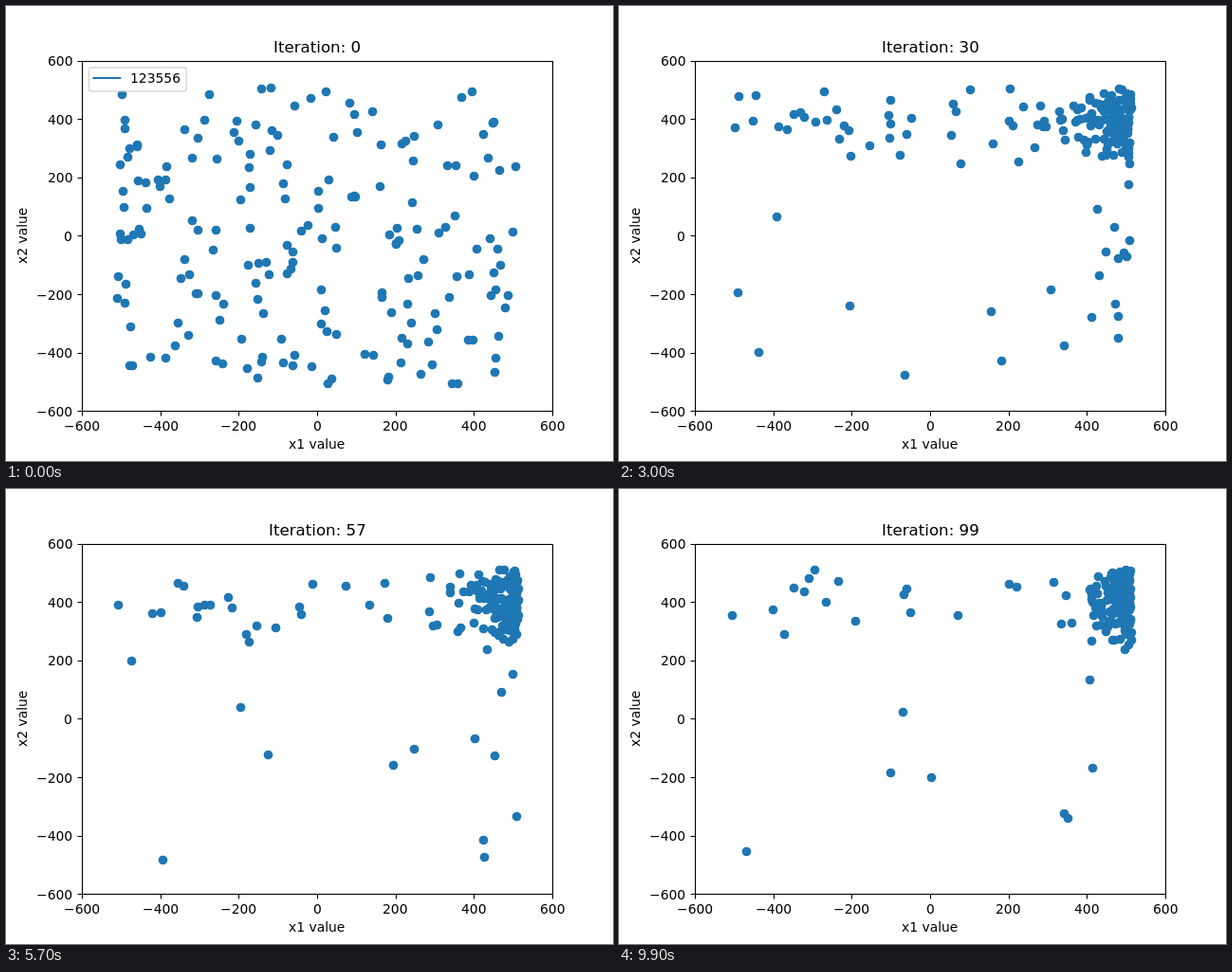
Recreate the animation shown at these times as an HTML page with a canvas. Size 640 px wide and 480 px high, loop 10000 ms.

```html
<!DOCTYPE html>
<html lang="en">
<head>
<meta charset="utf-8">
<title>Population scatter</title>
<style>
  html, body { margin: 0; width: 100%; height: 100%; overflow: hidden; background: #fff; }
  canvas, svg { position: absolute; left: 0; top: 0; width: 640px; height: 480px; display: block; }
  text { font: 13.889px "DejaVu Sans", sans-serif; fill: #000; }
  .title { font-size: 16.667px; }
</style>
</head>
<body>
<canvas id="dots" width="640" height="480"></canvas>
<svg id="chart" viewBox="0 0 640 480">
  <rect x="80.5" y="58.5" width="496" height="369" fill="none" stroke="#000" stroke-width="1.11"/>
  <path id="ticks" stroke="#000" stroke-width="1.11"/>
  <g id="legend">
    <rect x="87.4" y="65" width="102.8" height="25" rx="2.8" fill="#fff" fill-opacity=".8" stroke="#ccc" stroke-opacity=".8" stroke-width="1.39"/>
    <path d="M92.5 76H120.3" stroke="#1f77b4" stroke-width="2.08" stroke-linecap="square"/>
    <text x="131" y="81">123556</text>
  </g>
</svg>
<script>
const STEP = 100, STEPS = 100, SIZE = 190, EDGE = 512;
const byId = id => document.getElementById(id);
const ctx = byId("dots").getContext("2d");
const chart = byId("chart"), legend = byId("legend");

const px = x => 80 + (x + 600) * 496 / 1200;
const py = y => 427.2 - (y + 600) * 369.6 / 1200;
const snap = v => Math.round(v) + 0.5;

function seeded(seed) {
  let a = Math.imul(seed + 1, 0x9E3779B1);
  return () => {
    a = (a + 0x6D2B79F5) | 0;
    let t = Math.imul(a ^ (a >>> 15), 1 | a);
    t = (t + Math.imul(t ^ (t >>> 7), 61 | t)) ^ t;
    return ((t ^ (t >>> 14)) >>> 0) / 4294967296;
  };
}

// The population drifts from a uniform spread to the upper right corner.
function population(k) {
  const rnd = seeded(k);
  const span = (a, b) => a + (b - a) * rnd();
  const tail = s => -s * Math.log(1 - rnd());
  const bell = (mean, sd) => {
    const y = mean + sd * (rnd() + rnd() + rnd() + rnd() - 2) * 1.73;
    return y > EDGE ? bell(mean, sd) : y;
  };
  const decay = Math.exp(-k / 45);
  const scale = 34 + 90 * Math.exp(-k / 25);
  const pts = [];
  const add = (n, make) => {
    const end = Math.min(SIZE, pts.length + Math.round(n));
    while (pts.length < end) pts.push(make());
  };

  add(SIZE * Math.exp(-k / 6), () => [span(-EDGE, EDGE), span(-EDGE, EDGE)]);
  // stragglers below, a band along the top, and the dense corner
  add(5 + 30 * decay, () => [
    rnd() < 0.4 ? span(-EDGE, 300) : EDGE - Math.min(tail(90), 400),
    span(-EDGE, 215)
  ]);
  add(11 + 48 * decay, () => [span(-EDGE, 330), bell(385, 68)]);
  add(SIZE, () => [EDGE - Math.min(tail(scale), 310), bell(400, 72)]);
  return pts;
}

// Sets text on whole pixels; align is 0 for left, 0.5 for centre, 1 for right.
function setText(el, text, x, align) {
  el.textContent = text;
  el.setAttribute("x", Math.round(x - align * el.getComputedTextLength()));
}

function addText(text, x, y, align = 0.5, attrs = {}) {
  const el = document.createElementNS("http://www.w3.org/2000/svg", "text");
  for (const name in attrs) el.setAttribute(name, attrs[name]);
  el.setAttribute("y", y);
  chart.append(el);
  setText(el, text, x, align);
  return el;
}

function buildAxes() {
  let marks = "";
  for (let v = -600; v <= 600; v += 200) {
    const label = String(v).replace("-", "\u2212");
    marks += `M${snap(px(v))} 427.5v5M80.5 ${snap(py(v))}h-5`;
    addText(label, px(v), 448);
    addText(label, 70.3, Math.round(py(v) + 5.6), 1);
  }
  byId("ticks").setAttribute("d", marks);
  addText("x1 value", 328, 467);
  addText("x2 value", -242.4, 22, 0.5, { transform: "rotate(-90)" });
}

function draw(k) {
  ctx.clearRect(0, 0, 640, 480);
  ctx.fillStyle = "#1f77b4";
  for (const [x, y] of population(k)) {
    ctx.beginPath();
    ctx.arc(snap(px(x)), snap(py(y)), 4.86, 0, Math.PI * 2);
    ctx.fill();
  }
  setText(title, "Iteration: " + k, 328, 0.5);
  legend.style.display = k === 0 ? "" : "none";
}

let shown = -1;
function tick() {
  const k = Math.floor(performance.now() / STEP) % STEPS;
  if (k !== shown) draw(shown = k);
  requestAnimationFrame(tick);
}

buildAxes();
const title = addText("", 328, 49, 0.5, { class: "title" });
tick();
</script>
</body>
</html>
```
